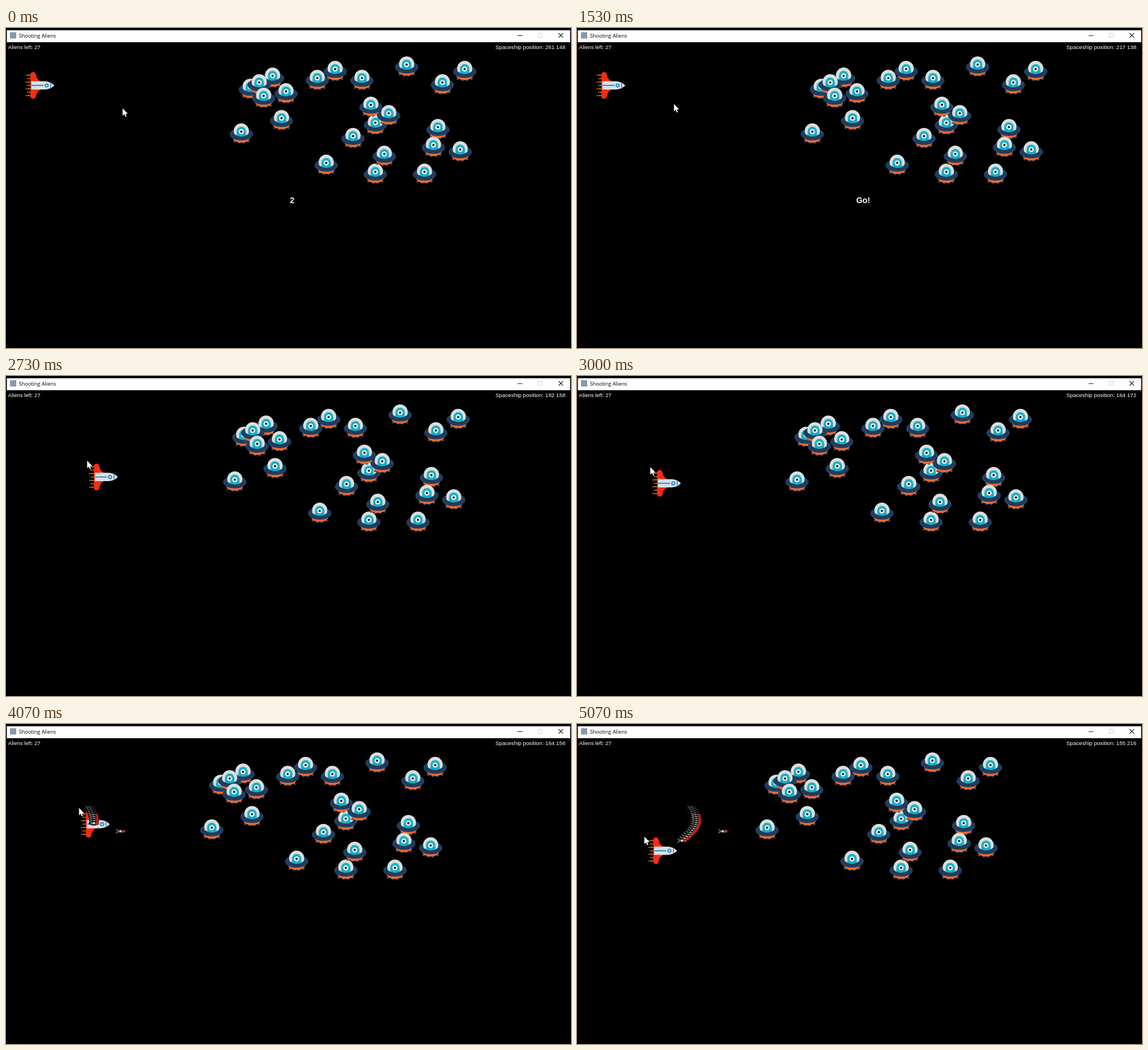
An HTML page with a canvas for the animation above (5140 ms loop, 994 by 563 pixels).

```html
<!DOCTYPE html>
<html lang="en">
<head>
<meta charset="utf-8">
<title>Shooting Aliens</title>
<style>
html, body { margin: 0; width: 100%; height: 100%; overflow: hidden; background: #000; }
canvas, svg { position: absolute; left: 0; top: 0; width: 994px; height: 563px; }
text { fill: #fff; font-family: "Liberation Sans", Arial, sans-serif; }
#title { fill: #000; font: 9.1px "Open Sans", "Noto Sans", sans-serif; }
#count { font-size: 14.2px; font-weight: bold; text-anchor: middle; }
</style>
</head>
<body>
<canvas id="stage" width="994" height="563"></canvas>
<svg viewBox="0 0 994 563">
  <text id="title" x="22.7" y="17">Shooting Aliens</text>
  <text x="3.6" y="37" font-size="9.5">Aliens left: 27</text>
  <text id="pos" x="861" y="37" font-size="9.8"></text>
  <text id="count" x="503.5" y="308"></text>
</svg>
<script>
const ctx = document.getElementById('stage').getContext('2d');
const posText = document.getElementById('pos');
const countText = document.getElementById('count');

const LOOP = 5140, STEP = 200 / 3, SCALE = 0.786, TOP = 25, CELL = 7.86;
const START = 2600, FIRST_SHOT = 3030, BURST = 3670, BURST_LEN = 800, SHOTS = 18;

// time, mouse x and y in game units, sideways bow of the way to the next point
const mousePath = [
  [0, 261, 148, 0], [930, 239, 128, 0], [2270, 190, 151, 0], [START, 190, 151, 0],
  [3000, 164, 172, 0], [3400, 164, 172, 0], [BURST, 115, 117, 22],
  [BURST + BURST_LEN, 168, 195, 0], [LOOP, 154, 218, 0]
];
// time, distance the fleet has moved left
const fleetPath = [[2530, 0], [FIRST_SHOT, 28.6], [BURST, 37], [BURST + BURST_LEN, 67], [LOOP, 81]];
// pauses in which the picture stands still
const holds = [[1600, 1800], [2330, START], [3330, 3470]];

// column and row of each alien on the spawn grid, back to front
const aliens = [
  [2, 5], [7, 2.5], [4, 4], [5, 7], [10, 6], [9, 12], [0, 15], [21, 1],
  [17, 3], [27, 3], [37, 0], [50, 1], [45, 4], [30, 13], [29, 9], [33, 10.9],
  [25, 16], [44, 14], [43, 18], [49, 19], [19, 22], [30, 24], [32, 20], [41, 24]
];

function sample(keys, t) {
  const i = keys.findIndex(k => k[0] > t);
  if (i < 1) return [...keys[i < 0 ? keys.length - 1 : 0].slice(1)];
  const a = keys[i - 1], b = keys[i], u = (t - a[0]) / (b[0] - a[0]);
  const out = a.slice(1).map((v, n) => v + (b[n + 1] - v) * u);
  out[0] += (a[3] || 0) * Math.sin(Math.PI * u);
  return out;
}

const fleet = t => sample(fleetPath, t)[0];

function shipAt(t) {
  if (t < START) return [34, 101];
  const [x, y] = sample(mousePath, t);
  return [x * SCALE + 3, y * SCALE + TOP + 28.6];
}

function snap(t) {
  const s = Math.round(Math.floor(t / STEP + 0.07) * STEP / 10) * 10;
  const pause = holds.find(([a, b]) => s > a && s < b);
  return pause ? pause[0] : s;
}

function rect(x, y, w, h, color) {
  ctx.fillStyle = color;
  ctx.fillRect(x, y, w, h);
}

function oval(x, y, rx, ry, color) {
  ctx.fillStyle = color;
  ctx.beginPath();
  ctx.ellipse(x, y, rx, ry, 0, 0, Math.PI * 2);
  ctx.fill();
}

function poly(points, color) {
  ctx.fillStyle = color;
  ctx.beginPath();
  points.forEach(p => ctx.lineTo(...p));
  ctx.fill();
}

function line(x1, y1, x2, y2, color, width = 1) {
  ctx.strokeStyle = color;
  ctx.lineWidth = width;
  ctx.beginPath();
  ctx.moveTo(x1, y1);
  ctx.lineTo(x2, y2);
  ctx.stroke();
}

function at(x, y, draw) {
  ctx.save();
  ctx.translate(x, y);
  draw();
  ctx.restore();
}

function alien() {
  for (let x = -12; x <= 12; x += 8) oval(x, 20.2 - Math.abs(x) / 4, 2.4, 1.8, '#4a4f5c');
  oval(0, 10.5, 15, 9, '#f4692c');
  oval(0, 4.5, 20.5, 11, '#213f61');
  for (let x = -15; x <= 15; x += 3) line(x, 8 - x * x / 60, x, 13 - x * x / 45, '#1a3250', 0.6);
  ctx.fillStyle = '#dbdfde';
  ctx.beginPath();
  ctx.arc(0, -1.2, 13.3, Math.PI, 0);
  ctx.ellipse(0, 2, 13, 6, 0, 0, Math.PI);
  ctx.fill();
  ctx.fillStyle = '#1bb0c6';
  ctx.beginPath();
  ctx.arc(0, -0.5, 8.3, Math.PI, 0);
  ctx.lineTo(8.3, 7);
  ctx.quadraticCurveTo(0, 10.5, -8.3, 7);
  ctx.fill();
  for (const x of [-4.6, 4.6]) line(x, 5, x, 8.6, '#15869c', 0.8);
  oval(0, 0, 4.4, 4.4, '#f4f6f6');
  oval(0, 0, 2.1, 2.1, '#1b2a42');
}

// upper half of the wing, mirrored by side = -1
function wing(side) {
  ctx.fillStyle = '#f62c12';
  ctx.beginPath();
  ctx.moveTo(9, 0);
  ctx.lineTo(9, -20 * side);
  ctx.quadraticCurveTo(10, -23.5 * side, 14, -23.5 * side);
  ctx.quadraticCurveTo(18, -23 * side, 18.5, -19 * side);
  ctx.quadraticCurveTo(20, -9 * side, 29, -6.5 * side);
  ctx.lineTo(29, 0);
  ctx.fill();
}

function ship() {
  for (let y = -18; y <= 18; y += 6) {
    const x = y % 12 ? 0.5 : 3;
    line(x, y, 9, y, '#f08a1c', 1.5);
    line(x + 2.5, y - 1, x + 2.5, y + 1, '#000', 0.8);
  }
  wing(1);
  wing(-1);
  ctx.fillStyle = '#d7e0e7';
  ctx.beginPath();
  ctx.moveTo(10.5, -7.3);
  ctx.lineTo(35, -7.3);
  ctx.quadraticCurveTo(45, -6.5, 51, 0);
  ctx.quadraticCurveTo(45, 6.5, 35, 7.3);
  ctx.lineTo(10.5, 7.3);
  ctx.fill();
  line(11, 0, 32, 0, '#2b80c2', 1.8);
  ctx.beginPath();
  ctx.arc(37.5, 0, 2.7, 0, Math.PI * 2);
  ctx.stroke();
  line(44.5, -4, 44.5, 4, '#2b80c2', 1.6);
}

function missile(dim) {
  oval(8.5, 0, 9, 4, '#000');
  ctx.globalAlpha = dim ? 0.5 : 1;
  line(0.5, -3.6, 4, -1.5, '#85868e', 1.3);
  line(0.5, 3.6, 4, 1.5, '#85868e', 1.3);
  rect(3, -1.6, 3, 3.2, '#777983');
  rect(5.5, -2.5, 7, 5, '#41434e');
  oval(8.6, 0, 2.1, 1.8, '#dfe1e5');
  poly([[12.5, -2.9], [14, -2.8], [18, 0], [14, 2.8], [12.5, 2.9]], dim ? '#4a3a50' : '#e42817');
}

function shot(t, fired, dim) {
  if (t < fired) return;
  const [x, y] = shipAt(fired);
  at(x + 14 + 2 * (fleet(t) - fleet(fired)), y, () => missile(dim));
}

function titleBar() {
  rect(1.5, 4, 991, 21, '#fff');
  rect(7, 7.5, 11, 11, '#8799ab');
  line(900, 13.5, 908.5, 13.5, '#222');
  ctx.strokeStyle = '#d4d4d4';
  ctx.strokeRect(936.5, 9.5, 7, 7);
  line(972, 9, 980, 17, '#222', 1.1);
  line(980, 9, 972, 17, '#222', 1.1);
}

// the pointer runs a little ahead of the game near the end
function cursor(t, mx, my) {
  const lead = Math.max(0, t - 4300) / 210;
  at(mx * SCALE - lead, my * SCALE + TOP + lead, () =>
    poly([[0, 0], [0, 13], [3, 10.4], [5.2, 15], [7, 14.2], [5, 9.8], [9, 9.3]], '#fff'));
}

function render(t) {
  const [mx, my] = sample(mousePath, t);
  const shift = t < START ? 0 : fleet(t);
  rect(0, 0, 994, 563, '#000');
  titleBar();
  at(...shipAt(t), ship);
  for (const [col, row] of aliens) at(414 + col * CELL - shift, 64.4 + row * CELL, alien);
  shot(t, FIRST_SHOT, false);
  for (let i = 0; i < SHOTS; i++) shot(t, BURST + BURST_LEN * (i + 0.5) / SHOTS, i < 4);
  cursor(t, mx, my);
  posText.textContent = `Spaceship position: ${Math.round(mx)} ${Math.round(my)}`;
  countText.textContent = t < 470 ? '2' : t < 1470 ? '1' : t < START ? 'Go!' : '';
}

const begin = performance.now();
function tick() {
  render(snap((performance.now() - begin) % LOOP));
  requestAnimationFrame(tick);
}
tick();
</script>
</body>
</html>
```
